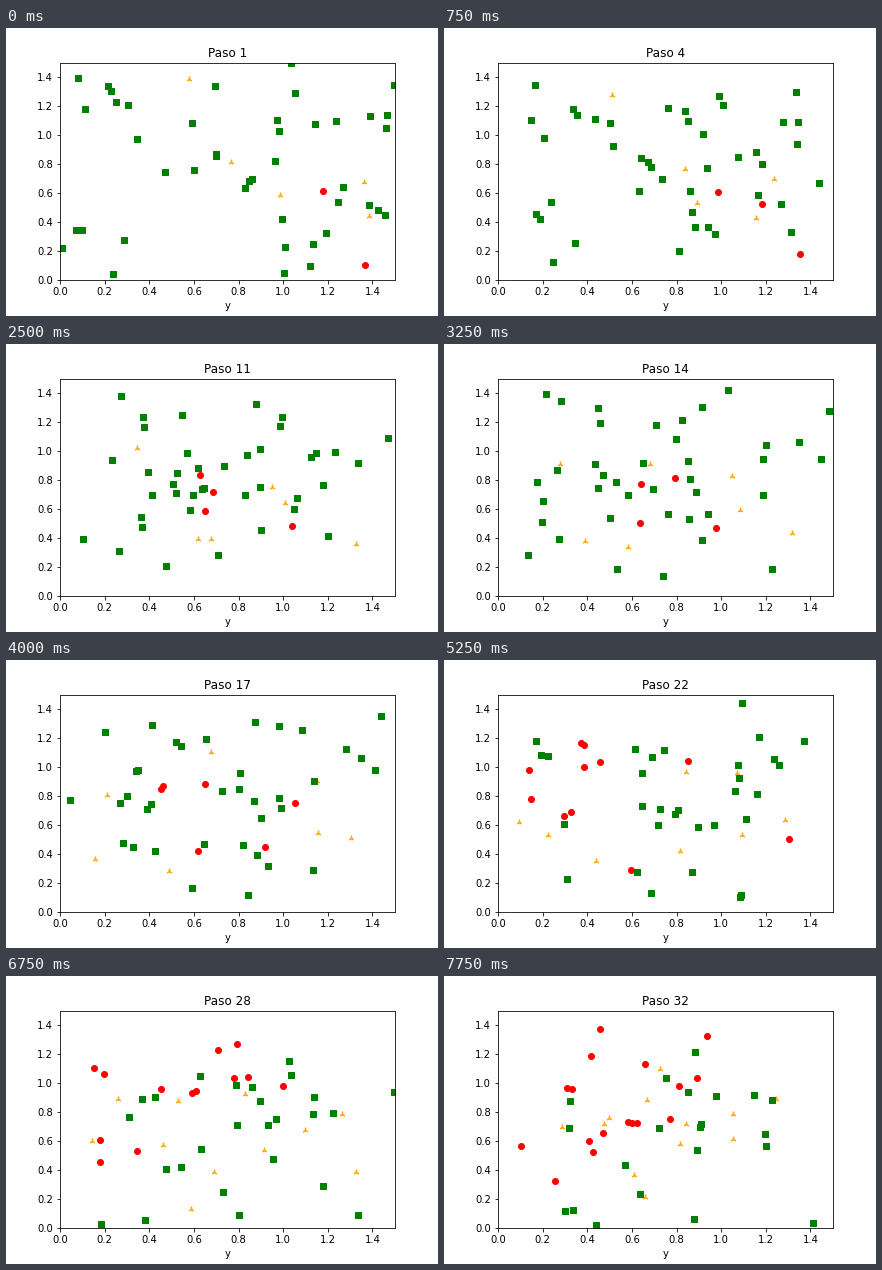
Recreate the animation shown at these times as a matplotlib script. Size 432 by 288 pixels, loop 8 s.

```python
import numpy as np
import matplotlib.pyplot as plt
from matplotlib.animation import FuncAnimation

SIDE = 1.5
STEPS = 32
AGENTS = 50

# the agents that are infected or immune at the start
FIRST_SICK = [(1.367, 0.103), (1.178, 0.614)]
FIRST_IMMUNE = [(0.578, 1.387), (0.766, 0.814), (0.986, 0.586),
                (1.362, 0.676), (1.384, 0.441)]

# course of the epidemic: agents still susceptible and already recovered
KEYS = [0, 7, 13, 16, 21, 24, 31]
SUSCEPTIBLE = [43, 41, 39, 37, 31, 30, 21]
RECOVERED = [5, 6, 7, 7, 8, 10, 12]

rng = np.random.default_rng(14)


def random_points(n):
    return rng.uniform(0, SIDE, (n, 2))


def move(pos, goal, speed):
    """Walk straight to the goal; on arrival choose a new one."""
    gap = goal - pos
    dist = np.hypot(*gap.T)
    pos = pos + gap * (np.minimum(speed, dist) / dist)[:, None]
    arrived = dist <= speed
    goal[arrived] = random_points(arrived.sum())
    return pos


def infect(pos, state):
    """Infect the susceptible agent closest to a sick one; return its index."""
    healthy = np.flatnonzero(state == "S")
    gap = pos[healthy, None] - pos[state == "I"]
    nearest = healthy[np.hypot(gap[..., 0], gap[..., 1]).min(axis=1).argmin()]
    state[nearest] = "I"
    return nearest


def simulate():
    first = FIRST_SICK + FIRST_IMMUNE
    pos = np.vstack([first, random_points(AGENTS - len(first))])
    goal = random_points(AGENTS)
    speed = rng.uniform(0.02, 0.09, AGENTS)
    state = np.full(AGENTS, "S")
    state[:len(FIRST_SICK)] = "I"
    state[len(FIRST_SICK):len(first)] = "R"
    queue = list(range(len(FIRST_SICK)))  # sick agents, longest first

    history = [(pos, state.copy())]
    for step in range(1, STEPS):
        pos = move(pos, goal, speed)
        while (state == "S").sum() > round(np.interp(step, KEYS, SUSCEPTIBLE)):
            queue.append(infect(pos, state))
        while (state == "R").sum() < round(np.interp(step, KEYS, RECOVERED)):
            state[queue.pop(0)] = "R"
        history.append((pos, state.copy()))
    return history


history = simulate()

fig, ax = plt.subplots(figsize=(6, 4), dpi=72)
fig.subplots_adjust(left=0.125, right=0.9, bottom=0.125, top=0.88)
ax.set(xlim=(0, SIDE), ylim=(0, SIDE), xlabel="y")
title = ax.set_title("Paso 1")

# drawn from bottom to top
STYLES = {"R": ("orange", "2"), "I": ("r", "o"), "S": ("g", "s")}
dots = {s: ax.scatter([], [], c=color, marker=marker)
        for s, (color, marker) in STYLES.items()}


def draw(step):
    pos, state = history[step]
    title.set_text(f"Paso {step + 1}")
    for s, group in dots.items():
        group.set_offsets(pos[state == s])
    return [title, *dots.values()]


anim = FuncAnimation(fig, draw, frames=STEPS, interval=250, repeat=True)
plt.show()
```
